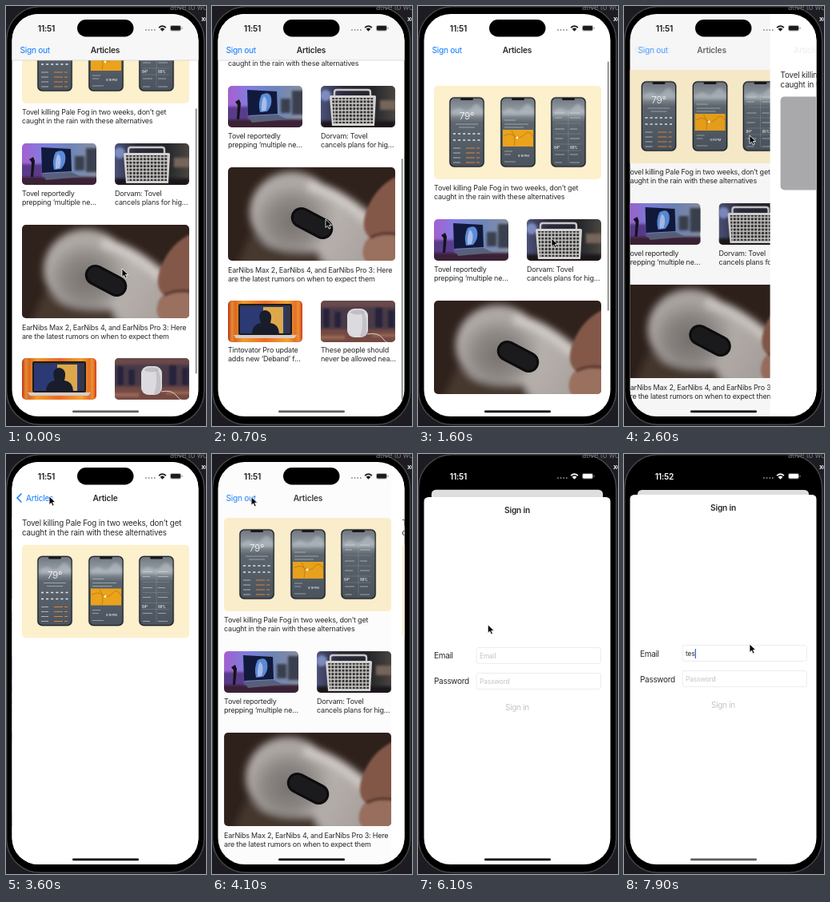
Animation of 250x526 px, one loop 8 s. Source, as an HTML page:

```html
<!DOCTYPE html>
<html lang="en">
<head>
<meta charset="utf-8">
<title>Articles app</title>
<style>
html, body { margin: 0; width: 100%; height: 100%; overflow: hidden; background: #1d1c22; }
svg { display: block; }
text { font: 9px Inter, Roboto, sans-serif; letter-spacing: -.21px; fill: #2a2a2c; }
.nav { font-size: 10.2px; letter-spacing: -.28px; }
.title { font-weight: 600; letter-spacing: -.2px; text-anchor: middle; }
.link { fill: #0a7aff; }
.lead { font-size: 9.8px; letter-spacing: -.16px; }
.label { font-size: 10px; letter-spacing: -.3px; }
.input { font-size: 8.4px; letter-spacing: -.15px; }
.hint { fill: #c4c4c7; }
.field { fill: #fff; stroke: #e8e8ea; stroke-width: .8; }
</style>
</head>
<body>
<svg width="250" height="526" viewBox="0 0 250 526">
<defs>
  <clipPath id="screen"><rect x="7.5" y="10" width="233" height="504" rx="33"/></clipPath>
  <clipPath id="viewport"><rect x="7" y="68" width="234" height="426"/></clipPath>
  <clipPath id="wide"><rect width="209" height="117" rx="5"/></clipPath>
  <clipPath id="small"><rect width="93" height="52" rx="5"/></clipPath>
  <filter id="soft" x="-40%" y="-40%" width="180%" height="180%"><feGaussianBlur stdDeviation="5"/></filter>
  <filter id="blur" x="-40%" y="-40%" width="180%" height="180%"><feGaussianBlur stdDeviation="1.8"/></filter>
  <linearGradient id="sky" x2="0" y2="1">
    <stop stop-color="#6f7780"/><stop offset=".2" stop-color="#98a0a7"/>
    <stop offset=".36" stop-color="#5d666f"/><stop offset="1" stop-color="#4b545e"/>
  </linearGradient>
  <linearGradient id="room"><stop stop-color="#a65fd0"/><stop offset=".3" stop-color="#7f7fe0"/><stop offset=".65" stop-color="#6d86b8"/><stop offset="1" stop-color="#8a8fa0"/></linearGradient>
  <linearGradient id="studio"><stop stop-color="#4c5278"/><stop offset=".3" stop-color="#2c2a3c"/><stop offset=".7" stop-color="#24262b"/><stop offset="1" stop-color="#4a4540"/></linearGradient>
  <linearGradient id="bars"><stop stop-color="#c23a1c"/><stop offset=".2" stop-color="#f39a2a"/><stop offset=".5" stop-color="#ee6a25"/><stop offset=".8" stop-color="#f6a030"/><stop offset="1" stop-color="#d2451f"/></linearGradient>
  <radialGradient id="bud" cx=".5" cy=".62" r=".62"><stop stop-color="#77716e"/><stop offset=".45" stop-color="#8f8986"/><stop offset=".8" stop-color="#b3adaa"/><stop offset="1" stop-color="#a09a96"/></radialGradient>
  <linearGradient id="stem" x2="1" y2=".6"><stop stop-color="#c4bfbc"/><stop offset="1" stop-color="#aaa29e"/></linearGradient>
  <pattern id="holes" width="4.400" height="4.400" patternUnits="userSpaceOnUse">
    <rect width="4.400" height="4.400" fill="#bdbcba"/><circle cx="2.200" cy="2.200" r="1.600" fill="#2b2a2a"/>
  </pattern>
  <pattern id="mesh" width="2" height="2" patternUnits="userSpaceOnUse">
    <rect width="2" height="2" fill="#141416"/><circle cx="1" cy="1" r=".5" fill="#38383a"/>
  </pattern>

  <g id="device">
    <rect x=".2" y=".2" width="43.600" height="87.600" rx="6" fill="#17191c" stroke="#777b80" stroke-width=".4"/>
    <rect x="1.5" y="1.5" width="41" height="85" rx="5" fill="url(#sky)"/>
    <path d="M3 19q8-8 14-3t12-4 13 5v6H3z" fill="#c6cbd0" opacity=".45" filter="url(#blur)"/>
    <rect x="14" y="1" width="16" height="3" rx="1.5" fill="#17191c"/>
  </g>

  <g id="feature" clip-path="url(#wide)">
    <rect width="209" height="117" fill="#fdf0cd"/>
    <use href="#device" x="19" y="14"/><use href="#device" x="83" y="14"/><use href="#device" x="146" y="14"/>
    <text x="41" y="42" style="font-size:12px;font-weight:300;fill:#fff;text-anchor:middle">79°</text>
    <g fill="none" stroke="#e4e8ec" stroke-width=".8">
      <path d="M27 48h28M31 52h20" opacity=".6"/>
      <path d="M24 60h34M24 68h34" stroke-dasharray="3 3.1" stroke-width="1.4"/>
      <path d="M24 78h9M24 84h9M24 90h9M24 96h9" opacity=".8"/>
      <path d="M40 78h17M40 84h17M40 90h17M40 96h17" stroke="#e0823d" stroke-width="1" stroke-dasharray="11 2"/>
      <path d="M88 43h14M88 48h30M88 52h24M88 82h10M88 86h8M88 95h14" opacity=".6"/>
      <path d="M151 34h12M170 34h12M151 40h9M170 40h13M151 54h12M170 54h9M151 66h10M170 66h12M151 86h12M170 86h10M151 96h9M170 96h12" opacity=".65"/>
      <path d="M151 47h33M151 60h33M151 73h33M151 81h33M168 30v67" opacity=".2"/>
    </g>
    <rect x="86" y="55" width="38" height="21" fill="#eba31c"/>
    <path d="M87 63q8-5 14 0t12-2 11 3M97 56q6 10 3 19" fill="none" stroke="#b9780c" stroke-width=".8"/>
    <circle cx="104" cy="65" r="1.4" fill="#fff"/>
    <text x="105" y="89" style="font-size:4px;fill:#fff">8:19 PM</text>
    <text x="150" y="79" style="font-size:4.5px;fill:#fff">84°</text>
    <text x="170" y="79" style="font-size:4.5px;fill:#fff">88%</text>
  </g>

  <g id="laptop" clip-path="url(#small)">
    <rect width="93" height="52" fill="url(#room)"/>
    <g filter="url(#blur)">
      <path d="M-4 26h30v16H-4z" fill="#5a3b8a"/>
      <path d="M66 16h12v18H66zM80 6h16v30H80z" fill="#3a3f50"/>
      <path d="M-4 42h102v14H-4z" fill="#3b2436"/>
    </g>
    <path d="M9 20l5-3 2 5-2 20h-3l1-18z" fill="#15131c"/>
    <path d="M24 5l37 2 1 28-37 2z" fill="#111a3c"/>
    <path d="M42 11q10-5 12 4t-5 17l-9 1q-3-12 2-22z" fill="#5b8bd8"/>
    <path d="M45 13q6 5 2 18l-5 1q-1-12 3-19z" fill="#c9d2f2" opacity=".7"/>
    <path d="M25 38l37-2 12 6-44 4z" fill="#59607a"/>
  </g>

  <g id="tower" clip-path="url(#small)">
    <rect width="93" height="52" fill="url(#studio)"/>
    <g filter="url(#blur)">
      <circle cx="6" cy="12" r="7" fill="#7d8cc0"/>
      <rect x="74" y="18" width="20" height="12" fill="#75655a"/>
      <rect y="44" width="93" height="10" fill="#1b191b"/>
    </g>
    <path d="M17 16V8q0-3 3-3h39q3 0 3 3v8" fill="none" stroke="#c9c8c6" stroke-width="2.400"/>
    <path d="M11 14q0-2 2-2h54q2 0 2 2l-2 36H14z" fill="#d3d2d0"/>
    <path d="M14 15h52l-1 32H16z" fill="url(#holes)"/>
  </g>

  <g id="earbud" clip-path="url(#wide)">
    <rect width="209" height="117" fill="#2f211b"/>
    <g filter="url(#soft)">
      <path d="M108 26Q146 34 186 62L182 126H130L92 108z" fill="url(#stem)"/>
      <ellipse cx="80" cy="56" rx="53" ry="51" fill="url(#bud)"/>
      <path d="M100 22Q140 32 176 66" fill="none" stroke="#d0cbc8" stroke-width="14"/>
      <path d="M28 84Q60 112 112 104L122 126H10z" fill="#47372f"/>
    </g>
    <g filter="url(#blur)">
      <path d="M214 10Q186 22 174 52T184 92L214 100z" fill="#84594a"/>
      <path d="M214 82Q176 78 170 98T182 122H214z" fill="#9a6f5e"/>
      <path d="M178 88Q192 80 212 84" fill="none" stroke="#5c3b30" stroke-width="4"/>
    </g>
    <g transform="rotate(28 105 70)">
      <rect x="77" y="57" width="56" height="26" rx="13" fill="#0c0c0e"/>
      <rect x="80" y="60" width="50" height="20" rx="10" fill="url(#mesh)"/>
    </g>
  </g>

  <g id="editor" clip-path="url(#small)">
    <rect width="93" height="52" fill="url(#bars)"/>
    <path d="M5 0v52M88 0v52" stroke="#f8bd45" stroke-width="4" opacity=".6" filter="url(#blur)"/>
    <rect x="13" y="4" width="67" height="39" rx="2" fill="#1b1b20"/>
    <rect x="15" y="6" width="63" height="35" fill="#2b3a74"/>
    <path d="M44 6h25v35H44z" fill="#dca84a"/>
    <path d="M30 41q1-12 11-13-5-14 5-16 11 1 7 16 10 1 11 13z" fill="#191c2a"/>
    <path d="M15 6h63v2H15zM72 8h6v33h-6z" fill="#34364a"/>
    <path d="M7 43h79l-3 4H10z" fill="#d5cdc8"/>
  </g>

  <g id="speaker" clip-path="url(#small)">
    <rect width="93" height="52" fill="#4a3a48"/>
    <g filter="url(#blur)">
      <path d="M-4-4h102v12H-4z" fill="#6b4a4c"/>
      <path d="M3 10h8v24H3zM17 14h8v20h-8zM68 8h9v26h-9zM84 12h8v22h-8z" fill="#25243a"/>
      <path d="M-4 36h102v20H-4z" fill="#754a42"/>
      <path d="M-4 44h34v4H-4zM64 42h34v3H64z" fill="#9a6a58"/>
    </g>
    <path d="M58 42q14-3 20 6t16 2" fill="none" stroke="#d6d0d0"/>
    <rect x="33" y="10" width="26" height="36" rx="9" fill="#dcdade"/>
    <ellipse cx="46" cy="14.500" rx="9" ry="3" fill="#c0bec6"/>
    <path d="M51 13q8 3 6 28-3 5-8 4 5-14 2-32z" fill="#b5b1ba" opacity=".6"/>
  </g>
</defs>

<rect width="250" height="526" fill="#1d1c22"/>
<rect x=".7" y=".7" width="247" height="523.5" rx="42" fill="#000" stroke="#47474a" stroke-width="1.4"/>
<text x="205" y="4.500" style="font-size:9.5px;fill:#77777b">ative to wo</text>
<text x="244" y="19" style="font-size:9px;font-weight:700;fill:#ddd">xc</text>

<g clip-path="url(#screen)">
  <rect width="250" height="526"/>
  <g id="root">
    <rect id="card" x="7" y="10" width="234" height="504" fill="#fff"/>
    <g id="list">
      <g clip-path="url(#viewport)">
        <g id="content">
          <use href="#feature" x="20" y="80"/>
          <text y="210.500"><tspan x="20">Tovel killing Pale Fog in two weeks, don’t get</tspan><tspan x="20" dy="11">caught in the rain with these alternatives</tspan></text>
          <use href="#laptop" x="20" y="247"/><use href="#tower" x="136" y="247"/>
          <text y="312.500"><tspan x="20">Tovel reportedly</tspan><tspan x="20" dy="11">prepping ‘multiple ne…</tspan></text>
          <text y="312.500"><tspan x="136">Dorvam: Tovel</tspan><tspan x="136" dy="11">cancels plans for hig…</tspan></text>
          <use href="#earbud" x="20" y="349"/>
          <text y="480.500"><tspan x="20">EarNibs Max 2, EarNibs 4, and EarNibs Pro 3: Here</tspan><tspan x="20" dy="11">are the latest rumors on when to expect them</tspan></text>
          <use href="#editor" x="20" y="516"/><use href="#speaker" x="136" y="516"/>
          <text y="581"><tspan x="20">Tintovator Pro update</tspan><tspan x="20" dy="11">adds new ‘Deband’ f…</tspan></text>
          <text y="581"><tspan x="136">These people should</tspan><tspan x="136" dy="11">never be allowed nea…</tspan></text>
        </g>
      </g>
      <rect id="thumb" x="236.800" width="1.900" rx=".95" fill="#000"/>
      <g id="bar"><rect x="7" y="10" width="234" height="58" fill="#f7f7f8"/><path d="M7 68h234" stroke="#c6c6c8" stroke-width=".6"/></g>
    </g>
    <rect id="pageDim" x="7" y="10" width="234" height="504"/>
    <g id="detail">
      <rect x="7" y="10" width="234" height="504" fill="#fff"/>
      <text class="lead" y="89.500"><tspan x="20">Tovel killing Pale Fog in two weeks, don’t get</tspan><tspan x="20" dy="12">caught in the rain with these alternatives</tspan></text>
      <rect id="placeholder" x="20" y="113.500" width="209" height="117" rx="5" fill="#a9a9ab"/>
      <use id="photo" href="#feature" x="20" y="113.500"/>
    </g>
    <text id="account" class="nav link" x="17.500" y="58.500">Sign out</text>
    <text id="listTitle" class="nav title" y="58.500">Articles</text>
    <g id="back"><path d="M19 50l-5 5 5 5" fill="none" stroke="#0a7aff" stroke-width="1.500" stroke-linecap="round"/><text class="nav link" x="25" y="58.500">Articles</text></g>
    <text id="detailTitle" class="nav title" y="58.500">Article</text>
    <rect id="rootDim" x="7" y="10" width="234" height="504"/>
  </g>
  <g id="sheet">
    <rect x="7" y="51" width="234" height="480" rx="6" fill="#fff"/>
    <text class="nav title" x="124" y="71">Sign in</text>
    <text class="label" x="20" y="253.500">Email</text>
    <rect class="field" x="73" y="239.500" width="155.500" height="20" rx="3"/>
    <text id="email" class="input" x="77" y="253"></text>
    <rect id="caret" y="244" width="1.200" height="12" fill="#4353d6"/>
    <text class="label" x="20" y="285.500">Password</text>
    <rect class="field" x="73" y="271.500" width="155.500" height="20" rx="3"/>
    <text class="input hint" x="77" y="285">Password</text>
    <text class="label hint" x="124" y="318" text-anchor="middle">Sign in</text>
  </g>
  <g id="status">
    <text id="clock" class="nav title" x="50.500" y="31.500" style="fill:inherit">11:51</text>
    <path d="M175 30h12" stroke="#8e8e93" stroke-width="1.800" stroke-linecap="round" stroke-dasharray="0 3.600"/>
    <path d="M190.500 26.500q5-4.600 10 0l-1.200 1.300q-3.800-3.500-7.600 0zM192.600 28.700q2.900-2.600 5.800 0l-2.900 3z"/>
    <rect x="205" y="24" width="14" height="7.500" rx="2.200" fill-opacity=".35"/>
    <rect x="206" y="25" width="12" height="5.500" rx="1.400"/><rect x="219.600" y="26.500" width="1" height="2.500" rx=".5" fill-opacity=".5"/>
  </g>
  <rect x="89" y="17" width="70.500" height="21.500" rx="10.700"/>
  <rect id="home" x="83" y="506.500" width="83" height="2.800" rx="1.400"/>
</g>
<path id="cursor" d="M0 0v10.500l2.500-2.300 1.700 3.800 1.900-.8-1.700-3.700h3.400z" stroke="#fff" stroke-width=".8"/>
</svg>

<script>
const LOOP = 8000, STEP = 100;
const $ = id => document.getElementById(id);
const clamp = (v, lo = 0, hi = 1) => Math.min(hi, Math.max(lo, v));
const set = (id, attrs) => { for (const k in attrs) $(id).setAttribute(k, attrs[k]); };

// Keys are [time, ...values], eased between neighbours.
const scrollKeys = [[0, 75], [700, 147], [800, 147], [1100, 117], [1200, 117], [1600, -20], [1900, 0]];
const cursorKeys = [
  [0, 145, 329], [700, 142, 267], [1000, 142, 262], [1200, 158, 195], [1600, 167, 291], [1800, 167, 291],
  [2300, 157, 162], [2700, 157, 162], [3300, 54, 53], [3900, 54, 53], [4400, 40, 55], [4600, 40, 55],
  [4900, 135, 112], [5100, 135, 112], [5350, 36, 55], [5600, 36, 55], [6300, 100, 253], [6500, 100, 253], [6900, 157, 238]
];

function track(keys, t) {
  const i = keys.findIndex(k => k[0] > t);
  if (i < 0) return keys[keys.length - 1].slice(1);
  const [a, b] = [keys[i - 1], keys[i]];
  const u = (t - a[0]) / (b[0] - a[0]), e = u * u * (3 - 2 * u);
  return a.slice(1).map((v, j) => v + (b[j + 1] - v) * e);
}

// Critically damped spring from 0 to 1.
function spring(ms, speed) {
  const x = Math.max(0, ms) / 1000 * speed, p = 1 - (1 + x) * Math.exp(-x);
  return p > .997 ? 1 : p;
}

function drawList(scroll, t) {
  const view = 426, height = 543, max = height - view, full = view * view / height;
  const over = Math.max(0, -scroll, scroll - max);
  set('content', { transform: `translate(0 ${-scroll})` });
  set('thumb', {
    y: 69.5 + clamp(scroll, 0, max) / height * view + (scroll > max ? over : 0),
    height: full - over - 2,
    opacity: .45 * clamp((2300 - t) / 300)
  });
  set('bar', { opacity: clamp(scroll / 8) });
}

function drawPush(p, t) {
  const loaded = t >= 3000;
  set('list', { transform: `translate(${-70 * p} 0)` });
  set('pageDim', { opacity: .14 * p });
  set('detail', { transform: `translate(${234 * (1 - p)} 0)`, visibility: p ? 'visible' : 'hidden' });
  set('photo', { opacity: +loaded });
  set('placeholder', { opacity: +!loaded });
  set('account', { opacity: clamp(1 - 1.2 * p) });
  set('listTitle', { x: 124 - 58 * p, opacity: clamp(1 - 1.2 * p) });
  set('back', { opacity: p * p });
  set('detailTitle', { x: 124 + 138 * (1 - p), opacity: p * p });
  $('account').textContent = t < 4700 ? 'Sign out' : 'Sign in';
}

function drawSheet(p, t) {
  const scale = 1 - .085 * p;
  set('root', { transform: `translate(${124 * (1 - scale)} ${10 + 35 * p - 10 * scale}) scale(${scale})` });
  set('card', { rx: 6 * p });
  set('rootDim', { opacity: .13 * p, rx: 6 * p });
  set('sheet', { transform: `translate(0 ${463 * (1 - p)})` });
  set('status', { fill: p > .5 ? '#fff' : '#1c1c1e' });
  const typed = 'tes'.slice(0, clamp(Math.floor((t - 7600) / 100), 0, 3));
  $('email').textContent = typed || 'Email';
  set('email', { class: typed ? 'input' : 'input hint' });
  set('caret', {
    x: typed ? 77.2 + $('email').getComputedTextLength() : 77,
    opacity: t < 6500 ? 0 : t < 7400 || t >= 7700 ? 1 : t < 7500 ? .5 : 0
  });
  $('clock').textContent = t < 7800 ? '11:51' : '11:52';
}

function frame() {
  const t = Math.floor(performance.now() % LOOP / STEP) * STEP;
  drawList(track(scrollKeys, t)[0], t);
  drawPush(t < 3650 ? spring(t - 2500, 9.6) : 1 - spring(t - 3650, 9.6), t);
  drawSheet(spring(t - 5450, 11), t);
  set('home', { fill: t < 1500 || t > 6300 ? '#5c5c5e' : '#000' });
  set('cursor', { transform: `translate(${track(cursorKeys, t)})` });
  requestAnimationFrame(frame);
}
frame();
</script>
</body>
</html>
```
